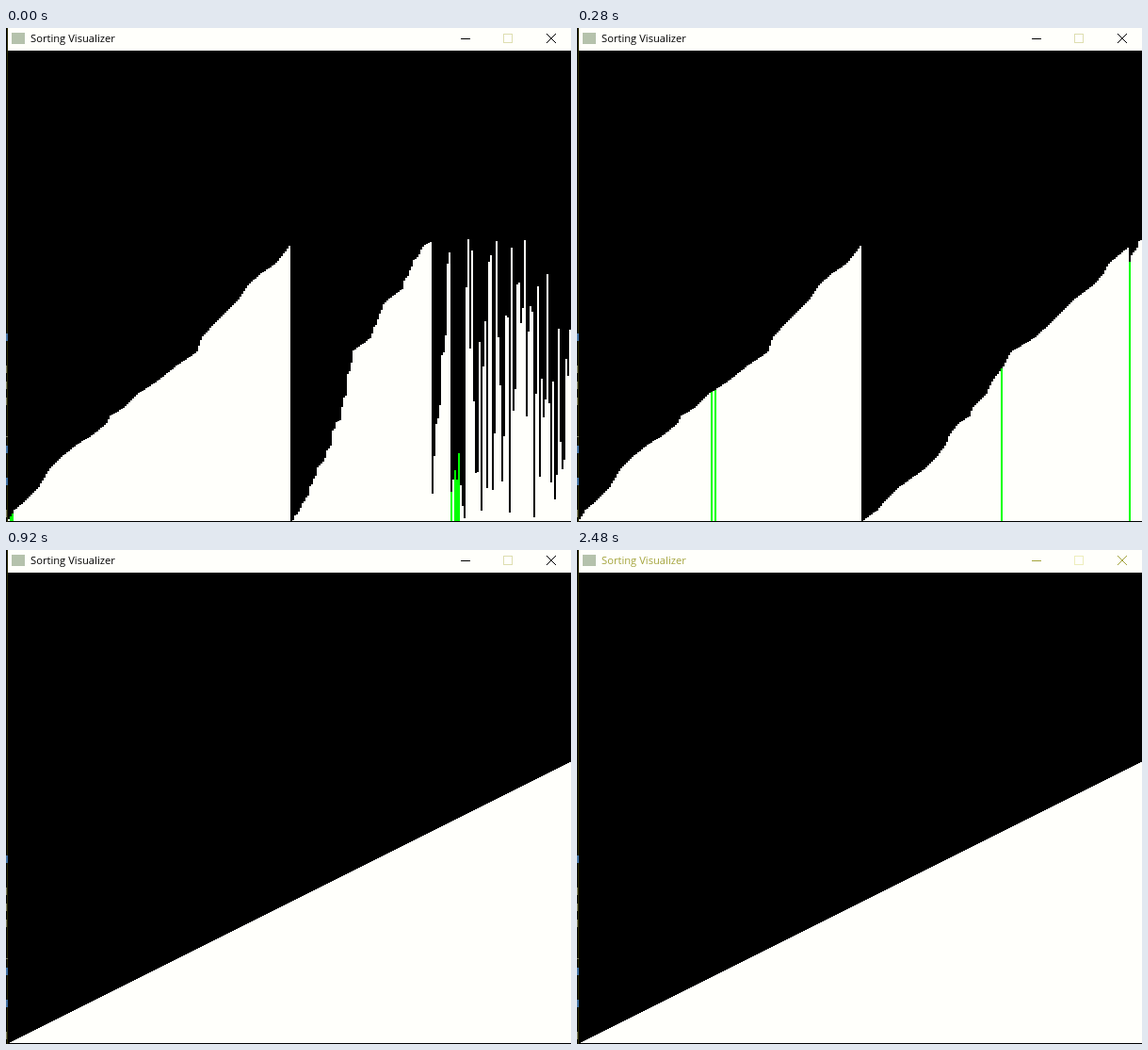
Recreate the animation shown at these times as an HTML page with a canvas. Size 600 by 524 pixels, loop 2.52 s.

```html
<!DOCTYPE html>
<html lang="en">
<head>
<meta charset="utf-8">
<title>Sorting Visualizer</title>
<style>
  html, body { margin: 0; width: 100%; height: 100%; overflow: hidden; background: #000; }
  canvas { position: absolute; left: 0; top: 0; }
  #title {
    position: absolute; left: 26px; top: 3px; line-height: 16px;
    font-family: "Open Sans", "Noto Sans", sans-serif; font-size: 11.2px; white-space: nowrap;
  }
</style>
</head>
<body>
<canvas id="stage" width="600" height="524"></canvas>
<div id="title">Sorting Visualizer</div>
<script>
const LOOP = 2520, TICK = 40, COUNT = 300, FLOOR = 523;
const WHITE = '#fffffb', GREEN = '#00ff00';
const ctx = document.getElementById('stage').getContext('2d');
const title = document.getElementById('title');

// Linear interpolation through [x, y] knots.
function along(knots, x) {
  let n = 1;
  while (n < knots.length - 1 && knots[n][0] < x) n++;
  const [x0, y0] = knots[n - 1], [x1, y1] = knots[n];
  return y0 + (y1 - y0) * Math.min(1, Math.max(0, (x - x0) / (x1 - x0)));
}

// Outline of the sorted left half, as [bar index, value].
const LEFT_OUTLINE = [
  [0, 2], [3, 12], [9, 22], [15.5, 35], [21.5, 55], [29, 70], [36.5, 82], [44, 91],
  [51.5, 103], [54, 112], [61.5, 121], [69, 136], [79, 149], [89, 165], [100, 180],
  [102.5, 195], [106.5, 204], [112, 215], [121.5, 234], [127.5, 252], [134, 263],
  [141.5, 273], [149, 292]
];

// The last quarter, still shuffled.
const SHUFFLED = [
  29, 69, 103, 108, 123, 175, 178, 196, 272, 285, 31, 53, 100, 43, 72, 38, 16, 3, 248,
  299, 183, 287, 126, 50, 51, 190, 11, 165, 212, 35, 273, 281, 34, 93, 297, 195, 143, 43,
  89, 218, 216, 8, 289, 118, 143, 251, 253, 211, 226, 298, 115, 200, 226, 221, 3, 135, 248,
  46, 150, 109, 127, 261, 125, 40, 145, 22, 51, 204, 83, 55, 65, 176, 151, 201, 163
];

// Build a permutation of 0..299: every wish takes the nearest unused value.
function makeValues() {
  const free = new Set(Array.from({ length: COUNT }, (_, v) => v));
  const take = wish => {
    for (let d = 0; ; d++) {
      for (const v of [wish + d, wish - d]) if (free.delete(v)) return v;
    }
  };
  const left = Array.from({ length: 150 }, (_, i) => take(Math.floor(along(LEFT_OUTLINE, i))));
  const last = SHUFFLED.map(take);
  return [...left.sort((a, b) => a - b), ...free, ...last];
}

const values = makeValues(), steps = [];

function mergeSort(l, r) {
  if (l >= r) return;
  const mid = (l + r) >> 1;
  mergeSort(l, mid);
  mergeSort(mid + 1, r);
  const a = values.slice(l, mid + 1), b = values.slice(mid + 1, r + 1);
  for (let i = 0, j = 0, k = l; k <= r; k++) {
    steps.push({ bars: values.slice(), l, r, k, marks: new Set([l, mid, r, k, i, j]) });
    values[k] = j >= b.length || (i < a.length && a[i] < b[j]) ? a[i++] : b[j++];
  }
}
mergeSort(0, COUNT - 1);
const done = { bars: values, marks: new Set() };
const firstStep = steps.findIndex(s => s.l === 235 && s.r === 239 && s.k === 238);

// Merge steps completed, by screen refresh.
const PACE = [[1, 0], [5, 296], [7, 570], [9, 781], [10, 878]];

function rect(color, x, y, w, h) {
  ctx.fillStyle = color;
  ctx.fillRect(x, y, w, h);
}

function lines(color, ...segments) {
  ctx.strokeStyle = color;
  ctx.lineWidth = 1;
  ctx.beginPath();
  for (const [x0, y0, x1, y1] of segments) {
    ctx.moveTo(x0, y0);
    ctx.lineTo(x1, y1);
  }
  ctx.stroke();
}

function drawWindow(faded) {
  const ink = faded ? '#a4a43c' : '#000';
  title.style.color = ink;
  rect('#000', 0, 0, 600, 524);
  rect('#292900', 1, 0, 1, 524);
  rect(WHITE, 2, 0, 598, 24);
  rect('#b5c2ac', 6, 5, 14, 12);
  lines(ink, [483, 11.5, 493, 11.5]);
  lines(ink, [574, 6, 584, 16], [584, 6, 574, 16]);
  ctx.strokeStyle = faded ? '#eeeebc' : '#dedeb0';
  ctx.strokeRect(528.5, 6.5, 9, 9);
  for (const y of [324, 443, 477]) rect('#3f6f9f', 0, y, 2, 8);
  for (const y of [358, 375, 392, 511]) rect('#77775a', 0, y, 1, 8);
  rect('#77775a', 0, 433, 2, 1);
}

function draw(time) {
  const tick = Math.floor(time / TICK);
  const step = steps[firstStep + Math.round(along(PACE, tick))] || done;
  drawWindow(time >= 2480);
  step.bars.forEach((v, i) =>
    rect(step.marks.has(i) ? GREEN : WHITE, 2 + 2 * i, FLOOR - v, 2, v));
}

const start = performance.now();
function play() {
  draw((performance.now() - start) % LOOP);
  requestAnimationFrame(play);
}
play();
</script>
</body>
</html>
```
